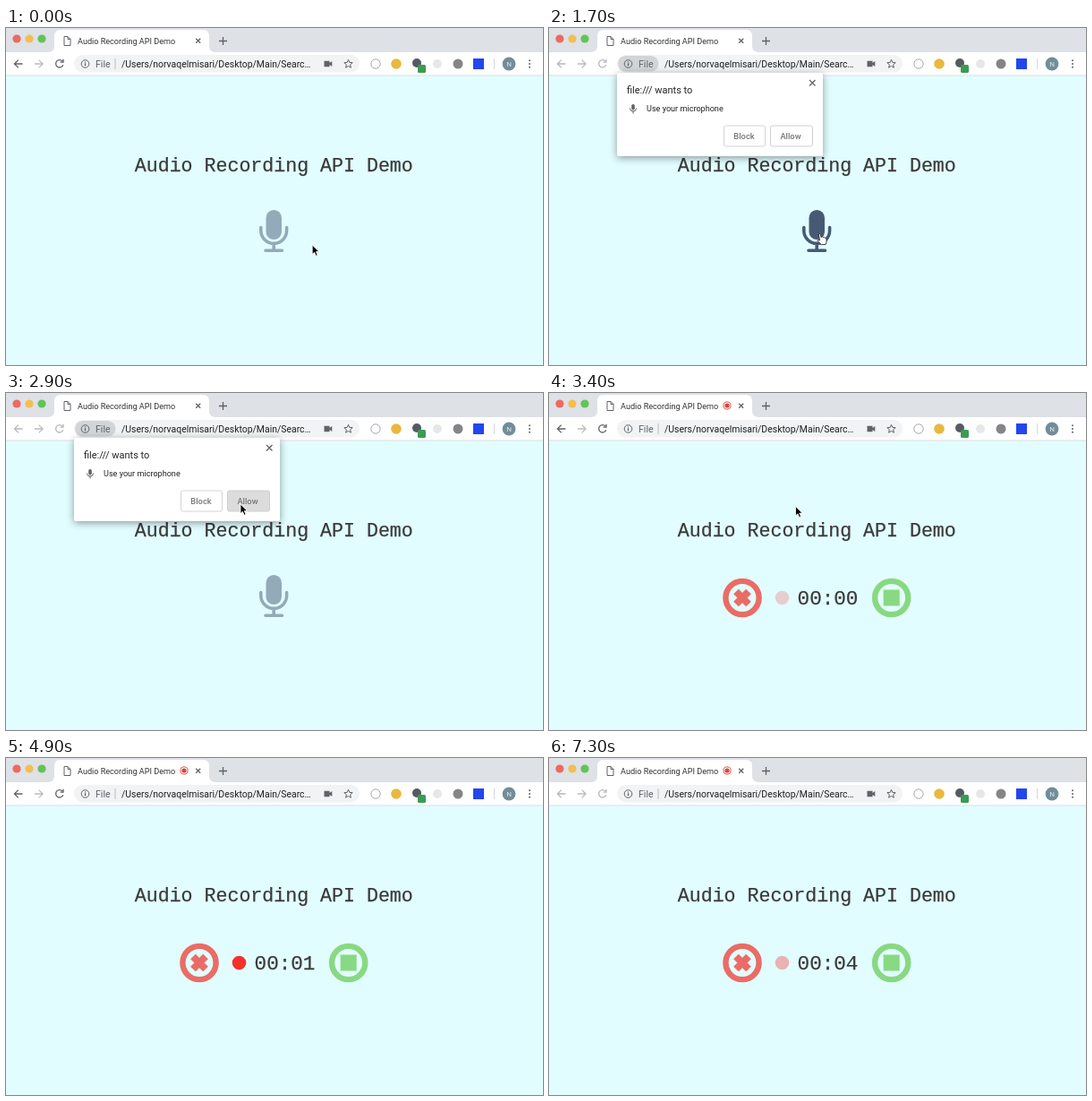
These frames come from a looping animation (600 px wide and 376 px high, 7.4 s). An HTML page:

```html
<!DOCTYPE html>
<html lang="en">
<head>
<meta charset="utf-8">
<title>Audio Recording API Demo</title>
<style>
  html, body { margin: 0; width: 100%; height: 100%; overflow: hidden; background: #e2fdff; }
  svg { display: block; width: 100vw; height: 100vh; }
  text { font-family: Roboto, sans-serif; }
  .mono { font-family: "Liberation Mono", "Courier New", monospace; text-anchor: middle; fill: #3a3a3a; stroke: #3a3a3a; stroke-width: .25; }
  .line { fill: none; stroke: #5f6368; stroke-width: 1.3; }
  .thin { stroke-width: 1; }
  .button { font-size: 9.3px; font-weight: 500; text-anchor: middle; fill: #777; }
  #popup { filter: drop-shadow(0 2px 4px #0006); }
</style>
</head>
<body>
<svg viewBox="0 0 600 376">
  <!-- Tab strip -->
  <rect width="600" height="28" fill="#dee1e6"/>
  <circle cx="12" cy="12" r="4.6" fill="#ec6a5f"/>
  <circle cx="26" cy="12" r="4.6" fill="#f4be50"/>
  <circle cx="40" cy="12" r="4.6" fill="#62c455"/>
  <path d="M47 27q7 0 7-7V9q0-7 7-7h159q7 0 7 7v11q0 7 7 7z" fill="#fff"/>
  <path class="line thin" d="M65 9.5h4l3 3v7h-7zM69 9.5v3h3"/>
  <text x="80" y="17.5" font-size="9.1" fill="#303336">Audio Recording API Demo</text>
  <g id="tabDot">
    <circle cx="199" cy="14" r="4.1" fill="none" stroke="#e0564e"/>
    <circle cx="199" cy="14" r="2.6" fill="#db4437"/>
  </g>
  <path class="line" d="M212.2 11.7l5 5m0-5l-5 5"/>
  <path class="line" d="M238 14.5h9m-4.5-4.5v9"/>

  <!-- Toolbar -->
  <rect y="27" width="600" height="26" fill="#fff"/>
  <rect y="52.5" width="600" height="1" fill="#dcdfe1"/>
  <g id="nav" class="line">
    <path d="M18.5 40H9.5m4.300-4.400L9.400 40l4.400 4.400"/>
    <path d="M63 37a4.200 4.200 0 1 0 .8 4.300M64 34.800v3.400h-3.400"/>
  </g>
  <path class="line" d="M32 40h9m-4.300-4.400L41.100 40l-4.400 4.400" style="stroke:#babcbe"/>
  <rect x="76" y="30" width="319" height="19.5" rx="9.750" fill="#f1f3f4"/>
  <rect id="chip" x="77" y="31" width="45.5" height="17.5" rx="8.750" fill="#d2d5d8"/>
  <circle class="line thin" cx="88.5" cy="40" r="4.300"/>
  <path class="line" d="M88.5 39.300v3m0-4.800v1.100"/>
  <text x="100" y="43.5" font-size="10.6" fill="#5f6368">File</text>
  <path id="divider" d="M122 34v12" stroke="#b9bcbf"/>
  <text x="129" y="43.5" font-size="10.45" fill="#1d1f21">/Users/norvaqelmisari/Desktop/Main/Searc…</text>
  <path d="M355.5 36.8h6v2.200l2.800-2v6l-2.800-2v2.200h-6z" fill="#5f6368"/>
  <path class="line thin" d="M382.500 35.300l1.300 3.100 3.400.3-2.600 2.200.8 3.300-2.900-1.700-2.900 1.700.8-3.300-2.600-2.200 3.400-.3z"/>
  <circle cx="413" cy="40" r="5.200" fill="none" stroke="#aaa"/>
  <circle cx="436" cy="40" r="5.800" fill="#e9b83e"/>
  <circle cx="459" cy="39" r="5" fill="#555b60"/>
  <rect x="460" y="41" width="9" height="9" rx="1.500" fill="#3b9b53"/>
  <circle cx="482" cy="40" r="5" fill="#e6e7e8"/>
  <circle cx="505" cy="40" r="5.500" fill="#858585"/>
  <rect x="522" y="34" width="12" height="12" fill="#2446ef"/>
  <path d="M545.500 34v12" stroke="#d5d8db"/>
  <circle cx="562" cy="40" r="7.400" fill="#718d99"/>
  <text x="562" y="42.800" font-size="8" text-anchor="middle" fill="#e3eaed">N</text>
  <path d="M585 36.300v.01m0 3.690v.01m0 3.690v.01" stroke="#5f6368" stroke-width="2" stroke-linecap="round"/>

  <!-- Page -->
  <text class="mono" x="299.300" y="160" font-size="21.600">Audio Recording API Demo</text>
  <g id="mic" fill="#475a75">
    <rect x="290.500" y="203" width="17.500" height="33" rx="8.750"/>
    <path d="M284.800 222.500v3.500a14.400 14.400 0 0 0 28.800 0v-3.500M299.200 241v7M290 248.200h18.500" fill="none" stroke="#475a75" stroke-width="3.600" stroke-linecap="round"/>
  </g>
  <g id="recorder">
    <g fill="none" stroke="#ea6c66">
      <circle cx="216" cy="228.500" r="18.600" stroke-width="6.400"/>
      <path d="M209 221.500l14 14m0-14l-14 14" stroke-width="8"/>
    </g>
    <circle id="dot" cx="260.500" cy="228.500" r="7.800" fill="#f5312b"/>
    <text id="timer" class="mono" x="311.500" y="236" font-size="22.600"></text>
    <circle cx="382.700" cy="228.500" r="18.600" fill="none" stroke="#88d982" stroke-width="6.400"/>
    <rect x="373.700" y="219.500" width="18" height="18" fill="#88d982"/>
  </g>

  <!-- Permission popup -->
  <g id="popup">
    <rect x="76" y="50" width="230" height="93" rx="2" fill="#fff"/>
    <text x="87" y="73" font-size="11" fill="#222">file:/// wants to</text>
    <path class="line" d="M291 58l6.500 6.500m0-6.500L291 64.500"/>
    <rect x="92.200" y="85" width="3.600" height="6.500" rx="1.800" fill="#5f6368"/>
    <path class="line thin" d="M90.500 89.500a3.500 3.500 0 0 0 7 0M94 93v2.500"/>
    <text x="109" y="93" font-size="9.1" fill="#222">Use your microphone</text>
    <rect x="195.500" y="109" width="46" height="23" rx="2" fill="#fff" stroke="#d4d4d4"/>
    <text class="button" x="218" y="123.500">Block</text>
    <rect id="allow" x="247.500" y="109" width="47" height="23" rx="2" stroke="#cfcfcf"/>
    <text class="button" x="270" y="123.500">Allow</text>
  </g>

  <g id="cursor" stroke-linejoin="round">
    <path id="arrow" d="M0 0v10.500l2.400-2.200 1.700 3.900 1.900-.8-1.700-3.800h3.300z" fill="#000" stroke="#fff" stroke-width=".8"/>
    <path id="hand" d="M-.8.5q1.300-1.200 2 .5l1 3 .5-.5q1.300-.5 1.700.5 1.400-.4 1.800.7 1.500-.2 1.700 1.200l.3 3-1.200 3.200H2.200L-1.500 8.500q-1-1.600.8-1.700l1.200.7z" fill="#fff" stroke="#222" stroke-width=".9"/>
  </g>
</svg>
<script>
const LOOP = 7400, STEP = 100;
const POPUP_START = 1600, RECORD_START = 2930, CURSOR_END = 4800, BLUR_START = 5700;
const el = id => document.getElementById(id);
const show = (id, visible) => { el(id).style.display = visible ? '' : 'none'; };

// Cursor stops: time, x, y
const stops = [
  [0, 342.2, 242], [400, 342.2, 242], [1000, 302, 229.5], [1700, 302, 229.5],
  [2500, 262, 124], [2930, 262, 124], [3400, 275.5, 126.5], [4000, 275.5, 126.5],
  [4700, 350, 252], [LOOP, 350, 252]
];

function cursorAt(t) {
  const i = stops.findIndex(stop => stop[0] > t);
  const [t0, x0, y0] = stops[i - 1], [t1, x1, y1] = stops[i];
  const p = (t - t0) / (t1 - t0), k = p * p * (3 - 2 * p);
  return [x0 + (x1 - x0) * k, y0 + (y1 - y0) * k];
}

// The CSS "ease" curve, solved for x by bisection
function ease(x) {
  const bezier = (a, b, s) => 3 * a * s * (1 - s) ** 2 + 3 * b * s * s * (1 - s) + s ** 3;
  let low = 0, high = 1;
  for (let i = 0; i < 20; i++) {
    const mid = (low + high) / 2;
    if (bezier(.25, .25, mid) < x) low = mid; else high = mid;
  }
  return bezier(.1, 1, low);
}

function draw(now) {
  const t = Math.floor(now % LOOP / STEP) * STEP;
  const recording = t >= RECORD_START;
  const asking = t >= POPUP_START && !recording;
  const [x, y] = cursorAt(t);
  const overMic = !recording && x > 283 && x < 316 && y > 203;
  const overAllow = x > 247 && x < 295 && y > 108 && y < 132;

  show('popup', asking);
  show('chip', asking);
  show('divider', !asking);
  show('mic', !recording);
  show('recorder', recording);
  show('tabDot', recording);
  show('cursor', t < CURSOR_END);
  show('hand', overMic);
  show('arrow', !overMic);
  el('cursor').setAttribute('transform', `translate(${x} ${y})`);
  el('mic').setAttribute('opacity', overMic ? 1 : .5);
  el('allow').setAttribute('fill', overAllow ? '#dcdcdc' : '#fff');
  el('nav').style.stroke = asking || t >= BLUR_START ? '#b5b7ba' : '#5f6368';

  if (recording) {
    const seconds = (t - RECORD_START) / 1000, phase = seconds % 2;
    el('timer').textContent = '00:0' + Math.floor(seconds);
    el('dot').setAttribute('opacity', phase < 1 ? 1 - ease(phase) : ease(phase - 1));
  }
  requestAnimationFrame(() => draw(performance.now() - start));
}

const start = performance.now();
draw(0);
</script>
</body>
</html>
```
